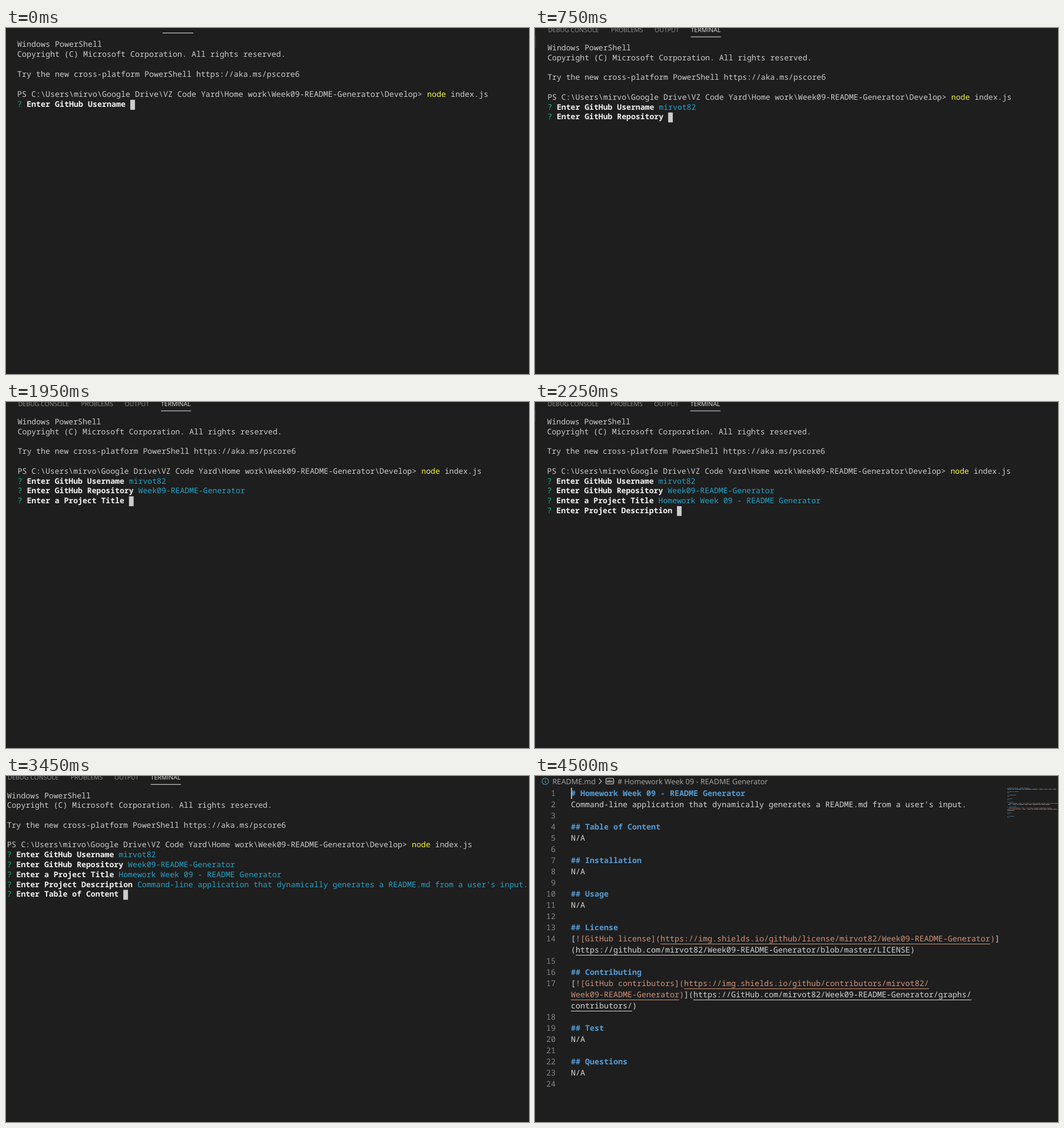
Recreate the animation shown at these times as an HTML page. Size 888x588 px, loop 5250 ms.

```html
<!DOCTYPE html>
<html lang="en">
<head>
<meta charset="utf-8">
<title>README generator demo</title>
<style>
  html, body { margin: 0; width: 100%; height: 100%; overflow: hidden; background: #1e1e1e; }
  svg { display: block; }
  text { font: 13.3333px "Noto Sans Mono", "DejaVu Sans Mono", monospace; text-rendering: geometricPrecision; }
  .ui { font-family: "Open Sans", "Noto Sans", sans-serif; }
  .tab { font-size: 10.7px; }
  .crumb { font-size: 12.7px; }
  .plain { fill: #ccc; }
  .code { fill: #d4d4d4; }
  .ask { fill: #f2f2f2; font-weight: bold; }
  .mark { fill: #0dbc79; }
  .answer { fill: #25a3c6; }
  .cmd { fill: #f5f543; }
  .head { fill: #569cd6; font-weight: bold; }
  .link { fill: #ce9178; }
  .num { fill: #858585; text-anchor: end; }
  .dim { fill: #949494; }
  .lit { fill: #e7e7e7; }
  .soft { fill: #a9a9a9; }
</style>
</head>
<body>
<svg id="stage" width="888" height="588" viewBox="0 0 888 588"></svg>
<script>
const CELL = 8, ROW = 17, EDITOR_ROW = 19, HOLD = 750;
const USER = 'mirvot82', REPO = 'Week09-README-Generator';
const TITLE = 'Homework Week 09 - README Generator';
const ABOUT = "Command-line application that dynamically generates a README.md from a user's input.";
const PROMPT = `PS C:\\Users\\mirvo\\Google Drive\\VZ Code Yard\\Home work\\${REPO}\\Develop> `;

const QUESTIONS = [
  ['Enter GitHub Username', USER],
  ['Enter GitHub Repository', REPO],
  ['Enter a Project Title', TITLE],
  ['Enter Project Description', ABOUT],
  ['Enter Table of Content', 'N/A'],
  ['Installation', 'N/A'],
  ['Usage', 'N/A'],
  ['Tests', 'N/A'],
  ['Questions', 'N/A'],
];

// Terminal views: left edge, first baseline, zoom, answers given
const VIEWS = [
  [19, 32, 1, 0],
  [21.2, 38.2, .985, 1],
  [19.7, 38.2, .985, 2],
  [20.6, 38.2, .984, 3],
  [1.7, 37.5, .9875, 4],
  [.9, 36.6, .9885, 9],
];

const rect = (x, y, w, h, fill, extra = '') =>
  `<rect x="${x}" y="${y}" width="${w}" height="${h}" fill="${fill}" ${extra}/>`;
const bar = (x, y, w, cls) => `<rect class="${cls}" x="${x}" y="${y}" width="${w}" height="1"/>`;
const label = (x, y, cls, str) => `<text x="${x}" y="${y}" class="${cls}">${str}</text>`;

// Gives each [class, text, underlined] segment its column
function place(segs) {
  let col = 0;
  return segs.map(([cls, str, under]) => {
    const seg = { cls, str, under, col };
    col += str.length;
    return seg;
  });
}

function line(segs, x, y) {
  return place(segs).map(s => {
    const left = x + s.col * CELL;
    const rule = s.under ? bar(left, y + 4, s.str.length * CELL, s.cls) : '';
    return label(left, y, s.cls, s.str) + rule;
  }).join('');
}

function terminal([x, y, zoom, given]) {
  const done = given === QUESTIONS.length;
  const rows = [
    [['plain', 'Windows PowerShell']],
    [['plain', 'Copyright (C) Microsoft Corporation. All rights reserved.']],
    [],
    [['plain', 'Try the new cross-platform PowerShell https://aka.ms/pscore6']],
    [],
    [['plain', PROMPT], ['cmd', 'node '], ['plain', 'index.js']],
  ];
  QUESTIONS.slice(0, given + 1).forEach(([ask, answer], i) => {
    const row = [['mark', '? '], ['ask', ask + ' ']];
    if (i < given) row.push(['answer', answer]);
    rows.push(row);
  });
  if (done) rows.push([['plain', 'Success!']], [['plain', PROMPT]]);

  const last = rows.length - 1;
  const end = rows[last].reduce((n, seg) => n + seg[1].length, 0);
  const tabs = [[1, 'DEBUG CONSOLE'], [109.5, 'PROBLEMS'], [184.6, 'OUTPUT'], [247, 'TERMINAL']];
  return `<g transform="translate(${x} ${y}) scale(${zoom})">`
    + rect(-40, -60, 20, 700, '#252526') + rect(-40, -26, 20, 21, '#37373d')
    + tabs.map(([left, str], i) => label(left, -32, 'ui tab ' + (i === 3 ? 'lit' : 'dim'), str)).join('')
    + bar(247, -24, 52, 'lit')
    + rows.map((row, i) => line(row, 0, i * ROW)).join('')
    + rect(end * CELL, last * ROW - 12, CELL, ROW, '#ccc')
    + '</g>';
}

function editor() {
  const head = str => [['head', str]];
  const text = str => [['code', str]];
  const section = name => [head('## ' + name), text('N/A'), []];
  // A leading null marks a wrapped row without a line number
  const rows = [
    head('# ' + TITLE), text(ABOUT), [],
    ...section('Table of Content'), ...section('Installation'), ...section('Usage'),
    head('## License'),
    [['code', '['], ['link', '![GitHub license]('],
      ['link', `https://img.shields.io/github/license/${USER}/${REPO}`, true], ['link', ')'], ['code', ']']],
    [null, ['code', '('], ['code', `https://github.com/${USER}/${REPO}/blob/master/LICENSE`, true], ['code', ')']],
    [],
    head('## Contributing'),
    [['code', '['], ['link', '![GitHub contributors]('],
      ['link', `https://img.shields.io/github/contributors/${USER}/`, true]],
    [null, ['link', REPO, true], ['link', ')'], ['code', ']('],
      ['code', `https://GitHub.com/${USER}/${REPO}/graphs/`, true]],
    [null, ['code', 'contributors/', true], ['code', ')']],
    [],
    ...section('Test'), ...section('Questions'),
  ];

  let out = '', map = '', number = 0;
  rows.forEach((row, i) => {
    const y = 34 + i * EDITOR_ROW;
    const segs = row.filter(Boolean);
    if (row[0] !== null) out += label(35, y, 'num', ++number);
    out += line(segs, 61, y);
    for (const s of place(segs)) {
      for (const word of s.str.matchAll(/[\w#]+/g)) {
        map += bar(802 + s.col + word.index, 20 + i * 2, word[0].length, s.cls);
      }
    }
  });

  return '<g fill="none" stroke="#519aba" stroke-width="1.2"><circle cx="17.5" cy="9" r="5.5"/>'
    + '<path d="M17.5 8v4M17.5 5.4v1.4"/></g>'
    + label(29.5, 13.5, 'ui crumb soft', 'README.md')
    + '<path d="M108.5 4.5l4.5 4.5l-4.5 4.5" fill="none" stroke="#c5c5c5" stroke-width="1.1"/>'
    + rect(120.5, 4, 13, 9.5, 'none', 'rx="1.5" stroke="#d4d4d4" stroke-width="1.1"')
    + '<text x="127" y="10.9" text-anchor="middle" class="ui" style="font-size:6px;font-weight:bold" fill="#d4d4d4">abc</text>'
    + label(140, 13.5, 'ui crumb soft', '# ' + TITLE)
    + out
    + rect(61, 20, 2, 19, '#aeafad')
    + `<g opacity=".55">${map}</g>`;
}

const stage = document.getElementById('stage');
stage.innerHTML = [...VIEWS.map(terminal), editor()]
  .map(scene => `<g visibility="hidden">${scene}</g>`).join('');
const scenes = [...stage.children];
let shown = -1;

function tick() {
  const now = Math.floor(performance.now() / HOLD) % scenes.length;
  if (now !== shown) {
    scenes.forEach((g, i) => g.setAttribute('visibility', i === now ? 'visible' : 'hidden'));
    shown = now;
  }
  requestAnimationFrame(tick);
}
tick();
</script>
</body>
</html>
```
